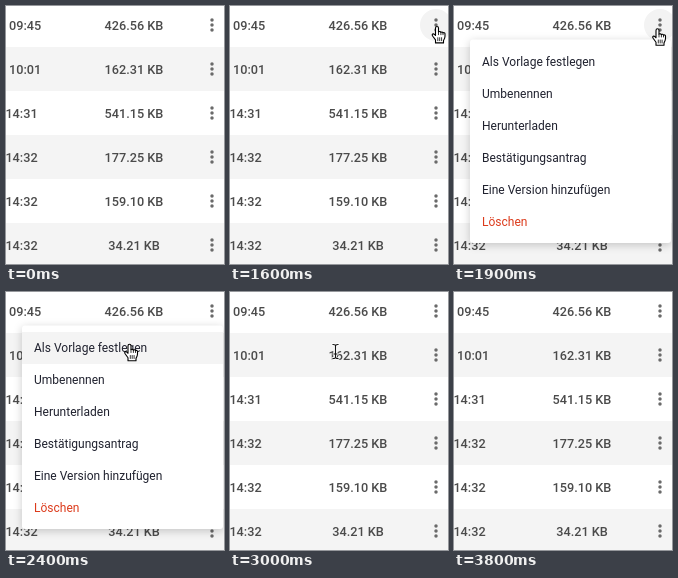
Animation of 218x258 px, one loop 4.8 s. Source, as an HTML page:

```html
<!DOCTYPE html>
<html lang="de">
<head>
<meta charset="utf-8">
<title>Dateimenü</title>
<style>
  html, body { margin: 0; width: 100%; height: 100%; overflow: hidden; background: #fff; }
  svg { display: block; width: 218px; height: 258px; font-family: Roboto, sans-serif; }
  #rows text { font-size: 12.7px; font-weight: 500; fill: #4b4b4b; }
  #rows .size { text-anchor: middle; }
  #rows circle { fill: #6a6a6a; }
  #menu { transform-origin: 206px 34px; }
  #panel { filter: drop-shadow(0 2px 4px rgba(0, 0, 0, .2)); }
  #menu text { font-size: 12px; fill: #20222f; }
  #menu .danger { fill: #dc3b1c; }
  .shape { fill: #fff; stroke: #000; stroke-width: 1.1; stroke-linejoin: round; stroke-linecap: round; }
</style>
</head>
<body>
<svg viewBox="0 0 218 258">
  <g id="stripes"></g>
  <circle id="hover" cx="206" cy="19" r="16" fill="#f3f3f3"/>
  <g id="rows"></g>
  <g id="menu">
    <rect id="panel" x="16" y="33.5" width="201" height="203.5" rx="3" fill="#fff"/>
    <rect id="active" x="16" y="40" width="201" height="32" fill="#f4f4f4"/>
  </g>
  <g id="hand" class="shape">
    <path d="M5.5 .8C4.6 .8 4 1.5 4 2.4V9.8L2.9 8.6C2.1 7.8 .9 8.1 .7 8.9C.6 9.4 .9 9.9 1.3 10.5L4 14.2V17.2H12V14.9C12.8 13.5 13.5 12.4 13.5 10.6V8C13.5 7 12.2 6.5 11.5 7.2C11.2 6.2 10 6 9.4 6.6C9 5.7 7.7 5.6 7 6.2V2.4C7 1.5 6.4 .8 5.5 .8Z"/>
    <path d="M7 6.2V9M9.4 6.6V9M11.5 7.2V9M6.3 12V15M8.2 12V15M10.1 12V15" stroke-width=".8"/>
  </g>
  <g id="beam" fill="none" stroke-linecap="square">
    <path d="M-2.5 -7Q0 -7 0 -5.5Q0 -7 2.5 -7M0 -5.5V5.5M-2.5 7Q0 7 0 5.5Q0 7 2.5 7M-1.5 2.5H1.5" stroke="#fff" stroke-width="2.6"/>
    <path d="M-2.5 -7Q0 -7 0 -5.5Q0 -7 2.5 -7M0 -5.5V5.5M-2.5 7Q0 7 0 5.5Q0 7 2.5 7M-1.5 2.5H1.5" stroke="#111" stroke-width="1.1"/>
  </g>
  <path id="arrow" d="M0 0V14.5L3.3 11.4L5.6 16.6L8 15.5L5.8 10.5H10.4Z" fill="#000" stroke="#fff" stroke-width="1"/>
</svg>
<script>
const LOOP = 4800, STEP = 100, ROW = 44;
const $ = id => document.getElementById(id);

function add(parent, tag, attrs, text) {
  const el = document.createElementNS('http://www.w3.org/2000/svg', tag);
  for (const key in attrs) el.setAttribute(key, attrs[key]);
  if (text) el.textContent = text;
  $(parent).append(el);
}

const files = [
  ['09:45', '426.56 KB'], ['10:01', '162.31 KB'], ['14:31', '541.15 KB'],
  ['14:32', '177.25 KB'], ['14:32', '159.10 KB'], ['14:32', '34.21 KB']
];
files.forEach(([time, size], i) => {
  const y = 19 + ROW * i;
  if (i % 2) add('stripes', 'rect', { x: 0, y: y - 22, width: 218, height: ROW, fill: '#f4f4f4' });
  add('rows', 'text', { x: i < 2 ? 3 : -0.6, y: y + 5 }, time);
  add('rows', 'text', { x: 128, y: y + 5, class: 'size' }, size);
  for (const d of [-5, 0, 5]) add('rows', 'circle', { cx: 206, cy: y + d, r: 1.75 });
});

['Als Vorlage festlegen', 'Umbenennen', 'Herunterladen', 'Bestätigungsantrag',
  'Eine Version hinzufügen', 'Löschen'].forEach((label, i) =>
  add('menu', 'text', { x: 28, y: 60 + 32 * i, class: i === 5 ? 'danger' : 'item' }, label));

// Tracks: [time, value, ...]
const tracks = {
  hand: [[700, 213, 19.7], [800, 206, 19.7], [900, 201.5, 19.7], [1700, 201.5, 19.7],
    [1900, 198, 22], [2400, 118, 51.5], [2600, 106, 55.5], [2800, 100, 57.5]],
  hover: [[600, 0], [900, 1], [1900, 1], [2100, 0]],
  menu: [[1700, 0], [1800, .65], [1900, 1], [2800, 1], [2900, .5], [3000, 0]],
  active: [[2100, 0], [2300, 1]]
};

function sample(track, t) {
  const next = track.findIndex(k => k[0] > t);
  if (next < 0) return track[track.length - 1].slice(1);
  if (next === 0) return track[0].slice(1);
  const a = track[next - 1], b = track[next];
  const p = (t - a[0]) / (b[0] - a[0]);
  return a.slice(1).map((v, i) => v + (b[i + 1] - v) * p);
}

function place(id, x, y, visible) {
  $(id).setAttribute('transform', `translate(${x} ${y})`);
  $(id).style.display = visible ? '' : 'none';
}

function draw(ms) {
  const t = Math.floor(ms % LOOP / STEP) * STEP;

  $('hover').style.opacity = sample(tracks.hover, t)[0];
  $('active').style.opacity = sample(tracks.active, t)[0];

  const open = sample(tracks.menu, t)[0];
  $('menu').style.opacity = open;
  $('menu').style.transform = t < 1900 ? `scale(${.75 + .25 * open})` : 'none';

  const [hx, hy] = sample(tracks.hand, t);
  place('hand', hx, hy, t >= 700 && t < 3000);

  // The pointer turns into a text beam while it crosses a line of text.
  const p = Math.min(1, Math.max(0, (t - 3100) / 600));
  const ease = p * p * (3 - 2 * p);
  const x = 105.5 + 1.5 * ease, y = 59.5 + 165.5 * ease;
  const offset = Math.abs((y - 19 + ROW / 2) % ROW - ROW / 2);
  const shown = t >= 3000 && t < 3800;
  place('beam', x, y, shown && offset < 9);
  place('arrow', x, y, shown && offset >= 9);
}

const start = performance.now();
function tick() {
  draw(performance.now() - start);
  requestAnimationFrame(tick);
}
tick();
</script>
</body>
</html>
```
